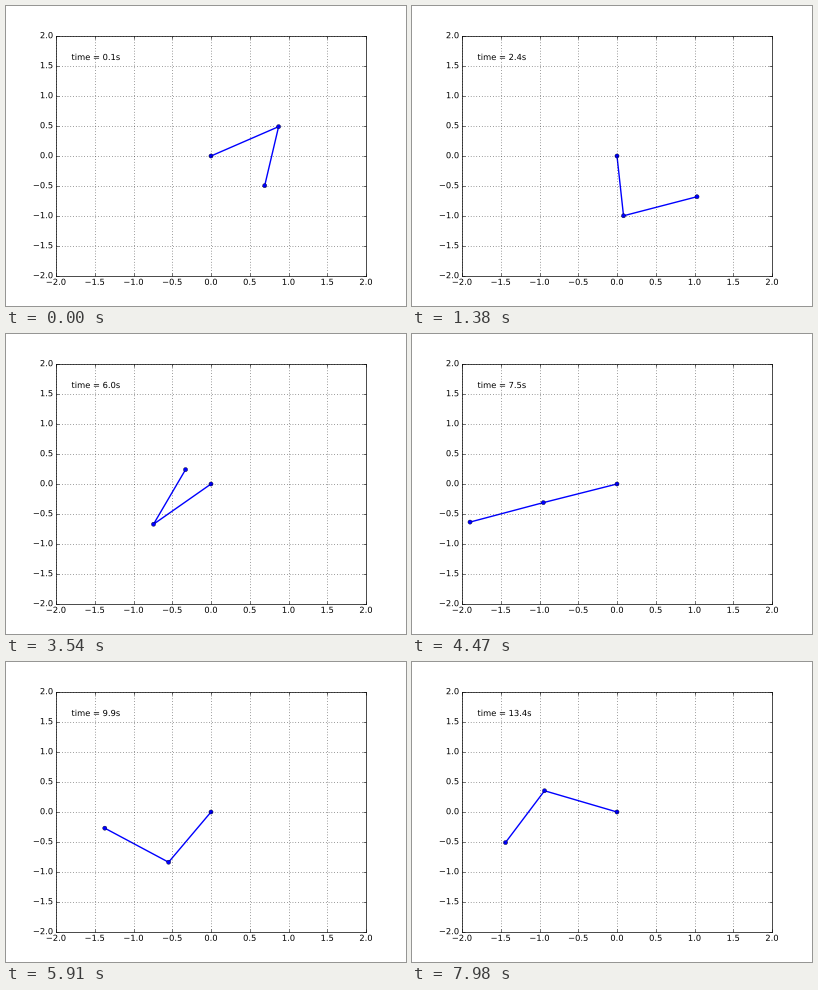
Animation, 400 px wide and 300 px high, one loop 8000 ms. Source, as a matplotlib script:

```python
import numpy as np
from numpy import cos, sin
import matplotlib.pyplot as plt
from matplotlib.animation import FuncAnimation
from matplotlib.patheffects import Normal

G = 9.8          # gravity, m/s^2
L1 = L2 = 1.0    # rod lengths, m
M1 = M2 = 1.0    # bob masses, kg
DT = 0.05        # simulated seconds per frame
FRAMES = 267
LOOP_MS = 8000
SUBSTEPS = 60


def derivs(state):
    th1, w1, th2, w2 = state
    delta = th2 - th1
    s, c = sin(delta), cos(delta)
    total = M1 + M2
    den1 = total * L1 - M2 * L1 * c * c
    den2 = (L2 / L1) * den1
    a1 = (M2 * L1 * w1 * w1 * s * c + M2 * G * sin(th2) * c
          + M2 * L2 * w2 * w2 * s - total * G * sin(th1)) / den1
    a2 = (-M2 * L2 * w2 * w2 * s * c + total * G * sin(th1) * c
          - total * L1 * w1 * w1 * s - total * G * sin(th2)) / den2
    return np.array([w1, a1, w2, a2])


def rk4(state, h):
    k1 = derivs(state)
    k2 = derivs(state + h / 2 * k1)
    k3 = derivs(state + h / 2 * k2)
    k4 = derivs(state + h * k3)
    return state + h / 6 * (k1 + 2 * k2 + 2 * k3 + k4)


def simulate(state, steps):
    path = [state]
    for _ in range(steps):
        for _ in range(SUBSTEPS):
            state = rk4(state, DT / SUBSTEPS)
        path.append(state)
    return np.array(path)


path = simulate(np.radians([120.0, 0.0, -10.0, 0.0]), FRAMES)
x1, y1 = L1 * sin(path[:, 0]), -L1 * cos(path[:, 0])
x2, y2 = x1 + L2 * sin(path[:, 2]), y1 - L2 * cos(path[:, 2])

plt.style.use("classic")
plt.rcParams.update({
    "savefig.dpi": "figure",
    "font.family": "DejaVu Sans",
    "text.hinting": "none",
    "grid.linewidth": 0.75,
    "xtick.major.width": 0.75,
    "ytick.major.width": 0.75,
    # drawing through a path effect keeps text and bobs at subpixel positions
    "path.effects": [Normal()],
})

fig = plt.figure(figsize=(8, 6), dpi=50, facecolor="white")
ax = fig.add_subplot(111, autoscale_on=False, xlim=(-2, 2), ylim=(-2, 2))
ax.grid()
rods, = ax.plot([], [], "o-", lw=2, color="blue")
clock = ax.text(0.05, 0.9, "", transform=ax.transAxes)


def draw(frame):
    i = frame + 1
    rods.set_data([0, x1[i], x2[i]], [0, y1[i], y2[i]])
    clock.set_text("time = %.1fs" % (i * DT))
    return rods, clock


anim = FuncAnimation(fig, draw, frames=FRAMES, init_func=lambda: draw(0),
                     interval=LOOP_MS / FRAMES, repeat=True, repeat_delay=0)
plt.show()
```
